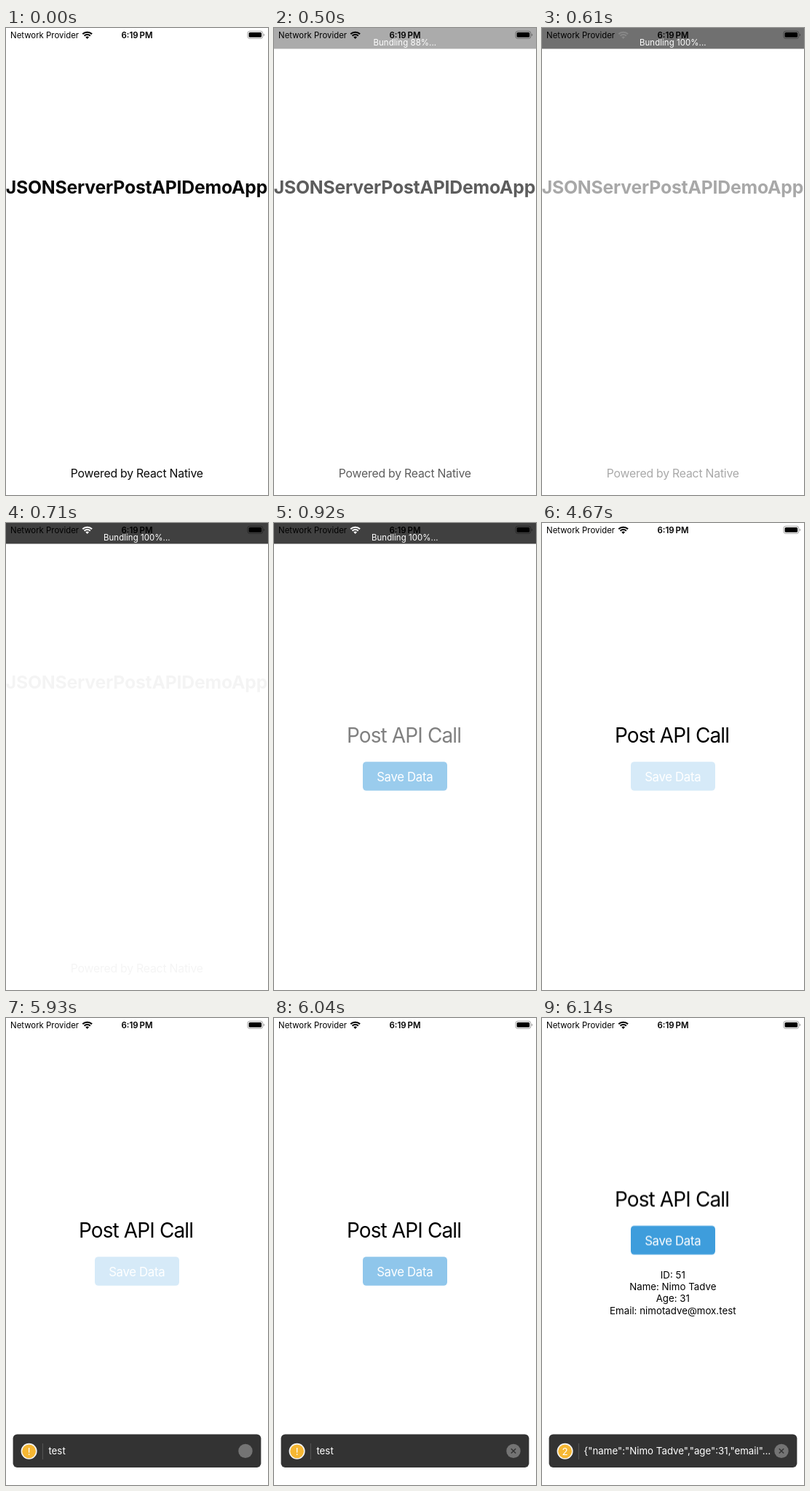
An HTML page that plays this animation: 360x640 px, repeating every 8000 ms.

```html
<!DOCTYPE html>
<html lang="en">
<head>
<meta charset="utf-8">
<title>Post API demo</title>
<style>
  html, body { margin: 0; width: 100%; height: 100%; overflow: hidden; background: #fff; }
  svg { display: block; width: 360px; height: 640px; }
  text { font-family: Inter, Roboto, "Liberation Sans", sans-serif; font-optical-sizing: none; }
  .mid { text-anchor: middle; }
  .white { fill: #fff; }

  .app-name { font-size: 24.8px; font-weight: 700; letter-spacing: -.23px; fill: #0a0a0a; }
  .powered { font-size: 15.8px; letter-spacing: -.22px; fill: #0a0a0a; }
  .title { font-size: 28px; letter-spacing: -.88px; }
  .label { font-size: 16.8px; letter-spacing: -.33px; }
  .body { font-size: 13.3px; }
  .small { font-size: 11.4px; }
  .bundling { font-size: 11.4px; letter-spacing: .08px; }
  .clock { font-size: 11.5px; font-weight: 600; }

  /* Every part shares one 8 s clock and holds each pose until the next. */
  .anim { animation: 8s step-end infinite; }
  .splash { animation-name: splash; }
  .banner { animation-name: banner; }
  .early { animation-name: early; }
  .late { animation-name: late; }
  .status { animation-name: status; }
  .wifi { animation-name: wifi; }
  .content { animation-name: content; }
  .shift { animation-name: shift; }
  .button { animation-name: button; }
  .toast { animation-name: toast; }
  .first { animation-name: first; }
  .second { animation-name: second; }
  .cross { animation-name: cross; }

  @keyframes splash {
    0% { opacity: 1; } 6.25% { opacity: .66; } 7.625% { opacity: .35; }
    8.875% { opacity: .04; } 10.25%, 100% { opacity: 0; }
  }
  @keyframes banner {
    0% { opacity: 0; } 6.25% { opacity: .44; } 7.625% { opacity: .75; }
    8.875% { opacity: 1; } 13% { opacity: .8; } 14.5% { opacity: .35; }
    15.875%, 100% { opacity: 0; }
  }
  @keyframes early { 0% { opacity: 1; } 7.625%, 100% { opacity: 0; } }
  @keyframes late { 0% { opacity: 0; } 7.625%, 100% { opacity: 1; } }
  @keyframes status { 0% { opacity: 1; } 15.875% { opacity: .88; } 17.25%, 100% { opacity: 1; } }
  @keyframes wifi {
    0% { color: #000; } 7.625% { color: #888; } 8.875% { color: #fff; }
    14.5% { color: #555; } 15.875%, 100% { color: #000; }
  }
  @keyframes content { 0% { opacity: 0; } 10.25% { opacity: .5; } 11.625%, 100% { opacity: 1; } }
  @keyframes shift { 0% { transform: none; } 76.75%, 100% { transform: translateY(-42.5px); } }
  @keyframes button {
    0% { opacity: 1; } 58.375% { opacity: .2; } 75.5% { opacity: .55; } 76.75%, 100% { opacity: .95; }
  }
  @keyframes toast { 0% { opacity: 0; } 74.125%, 100% { opacity: 1; } }
  @keyframes first { 0% { opacity: 1; } 76.75%, 100% { opacity: 0; } }
  @keyframes second { 0% { opacity: 0; } 76.75%, 100% { opacity: 1; } }
  @keyframes cross { 0% { opacity: 0; } 75.5%, 100% { opacity: 1; } }
</style>
</head>
<body>
<svg viewBox="0 0 360 640">
  <g class="anim splash">
    <text class="mid app-name" x="179.4" y="227">JSONServerPostAPIDemoApp</text>
    <text class="mid powered" x="179.8" y="616.2">Powered by React Native</text>
  </g>

  <g class="anim content">
    <g class="anim shift">
      <text class="mid title" x="178.5" y="301">Post API Call</text>
      <g class="anim button">
        <rect x="122" y="327.2" width="116" height="39.6" rx="4.8" fill="#3498db"/>
        <text class="mid label white" x="179.7" y="353.7">Save Data</text>
      </g>
    </g>
    <g class="anim second mid body">
      <text x="179.8" y="356.7">ID: 51</text>
      <text x="179.8" y="373">Name: Nimo Tadve</text>
      <text x="179.8" y="389.3">Age: 31</text>
      <text x="179.8" y="405.6">Email: nimotadve@mox.test</text>
    </g>
  </g>

  <g class="anim banner">
    <rect width="360" height="28.5" fill="#404040"/>
    <g class="mid bundling white">
      <text class="anim early" x="179.8" y="23.8">Bundling 88%...</text>
      <text class="anim late" x="179.8" y="23.8">Bundling 100%...</text>
    </g>
  </g>

  <g class="anim status">
    <text class="small" x="6.1" y="14">Network Provider</text>
    <g class="anim wifi" fill="none" stroke="currentColor" stroke-width="2.1">
      <path d="M105.3 8.3A9.2 9.2 0 0 1 118.1 8.3M107.6 10.7A5.8 5.8 0 0 1 115.8 10.7"/>
      <path d="M111.7 15L109.4 12.6A3.3 3.3 0 0 1 114 12.6Z" fill="currentColor" stroke="none"/>
    </g>
    <text class="mid clock" x="180" y="13.8">6:19&#8201;PM</text>
    <rect x="332" y="4.4" width="20.8" height="10" rx="2.8" fill="none" stroke="#000" stroke-opacity=".4" stroke-width=".9"/>
    <rect x="333.6" y="6" width="17.6" height="6.8" rx="1.6"/>
    <path d="M353.9 7.8Q355.2 8.3 355.2 9.4T353.9 11Z" fill-opacity=".4"/>
  </g>

  <g class="anim toast">
    <rect x="9.6" y="570.4" width="340.8" height="45.6" rx="5.8" fill="#333"/>
    <circle cx="31.6" cy="593.8" r="11" fill="#f4f4f4"/>
    <circle cx="31.6" cy="593.8" r="9.4" fill="#f6b733"/>
    <path d="M50.4 583V605" stroke="#575757"/>
    <g class="body white">
      <g class="anim first">
        <text class="mid" x="31.6" y="598.5">!</text>
        <text x="58.4" y="598.4">test</text>
      </g>
      <g class="anim second">
        <text class="mid" x="31.6" y="598.5">2</text>
        <text x="57.6" y="598.4">{"name":"Nimo Tadve","age":31,"email"…</text>
      </g>
    </g>
    <circle cx="329" cy="593.4" r="9.7" fill="#747474"/>
    <path class="anim cross" d="M325.8 590.2l6.4 6.4m0-6.4l-6.4 6.4" stroke="#333" stroke-width="1.4"/>
  </g>
</svg>
</body>
</html>
```
